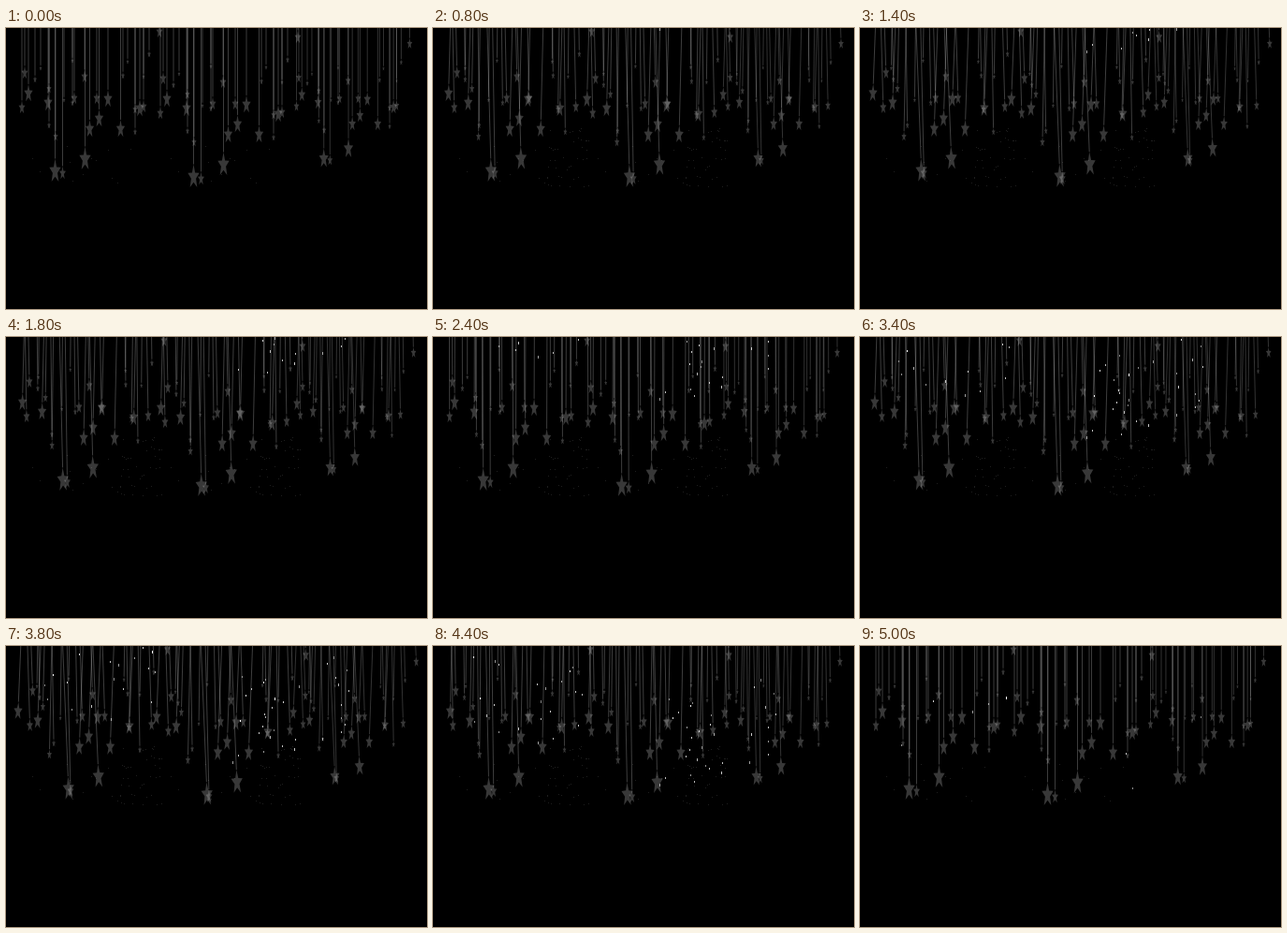
An HTML page with a canvas that plays this animation: 450x300 px, repeating every 5.2 s.

```html
<!DOCTYPE html>
<html lang="en">
<head>
<meta charset="utf-8">
<title>Hanging stars</title>
<style>
  html, body { margin: 0; width: 100%; height: 100%; overflow: hidden; background: #000; }
  canvas { display: block; }
</style>
</head>
<body>
<canvas id="stage" width="450" height="300"></canvas>
<script>
const ctx = document.getElementById('stage').getContext('2d');
const LOOP = 5200, STEP = 200, SWING = 2.5;
const PIVOT_Y = -200; // strings swing around points far above the stage
const FALL_SPEED = 41;

// Where the stars hang, from the nearest layer to the farthest.
// Each layer is smaller, sways less and swings against the one before.
const LAYERS = [
  [[52.5, 153], [84.5, 140]],
  [[24, 70], [45, 80], [89.5, 108], [99.5, 97], [109, 76], [122.5, 108], [143, 86]],
  [[17, 85], [20, 48], [60.5, 155], [73, 75], [84, 52], [97, 75], [147, 84], [164, 4]],
  [[46, 65], [53, 116], [138, 87]],
  [[31, 55], [46, 104], [71, 80], [125, 51], [138, 111], [153, 28]],
  [[37, 43], [62, 77], [71, 35], [130, 36], [147, 52]]
];

// The same curtain hangs three times
const CURTAINS = [
  { x: 0, y: 0, scale: 1 },
  { x: 148, y: 6, scale: 1 },
  { x: 296.5, y: 13.7, scale: 0.823 }
];

const GLITTER = [
  { left: 40, width: 120, start: 1.9, count: 26 },
  { left: 232, width: 84, start: 0.8, count: 28 },
  { left: 330, width: 40, start: 1.4, count: 13 }
];

const hash = (a, b) => {
  const v = Math.sin(a * 127.1 + b * 311.7) * 43758.5453;
  return v - Math.floor(v);
};

function starPath(radius) {
  ctx.beginPath();
  for (let i = 0; i < 10; i++) {
    const r = i % 2 ? radius * 0.42 : radius;
    const a = i * Math.PI / 5;
    ctx.lineTo(Math.sin(a) * r * 0.48, -Math.cos(a) * r);
  }
  ctx.closePath();
}

function drawStar(x, y, radius, offset) {
  const length = y - PIVOT_Y;
  ctx.save();
  ctx.translate(x, PIVOT_Y);
  ctx.rotate(-offset / length);
  ctx.translate(0, length);
  ctx.strokeStyle = 'rgba(255,255,255,.27)';
  ctx.lineWidth = 0.9;
  ctx.beginPath();
  ctx.moveTo(0, -length);
  ctx.lineTo(0, -radius);
  ctx.stroke();
  ctx.fillStyle = 'rgba(255,255,255,.22)';
  starPath(radius);
  ctx.fill();
  ctx.restore();
}

function drawCurtain({ x, y, scale }, swing) {
  ctx.save();
  ctx.translate(x, y);
  ctx.scale(scale, scale);
  LAYERS.forEach((stars, depth) => {
    const radius = 13.5 * 0.75 ** depth;
    const offset = 15 * (-0.77) ** depth * swing;
    for (const [starX, starY] of stars) drawStar(starX, starY, radius, offset);
  });
  ctx.restore();
}

function drawDust(frame) {
  const dense = frame % 5 !== 0;
  ctx.fillStyle = '#1e1e1e';
  for (const left of [0, 148]) {
    for (let i = 0; dense && i < 42; i++) {
      const x = left + 121 + Math.floor(hash(i, 1) * 46);
      ctx.fillRect(x, 107 + Math.floor(i / 6) * 10 + Math.floor(hash(i, 2) * 5), 1, 1);
    }
    for (let i = 0; i < 12; i++) {
      const x = left + 20 + Math.floor(hash(i, 3) * 150);
      ctx.fillRect(x, 124 + Math.floor(hash(i, 4) * 44), 1, 1);
    }
  }
}

function drawGlitter({ left, width, start, count }, frame, time) {
  const visible = time > 4.7 ? 0.2 : 0.8;
  for (let i = 0; i < count; i++) {
    const born = start + 2.3 * i / count;
    if (time < born || hash(i + left, frame + 5) > visible) continue;
    const x = left + Math.floor(hash(i, left) * width);
    const y = Math.floor((time - born) * FALL_SPEED);
    ctx.fillStyle = `rgba(255,255,255,${0.5 + 0.5 * hash(i, 9)})`;
    ctx.fillRect(x, y, 1, i % 4 ? 2 : 3);
  }
}

function draw(now) {
  const frame = Math.floor((now % LOOP) / STEP);
  const time = frame * STEP / 1000;
  const swing = 1 - Math.abs(1 - 2 * (time / SWING % 1));

  ctx.fillStyle = '#000';
  ctx.fillRect(0, 0, 450, 300);
  drawDust(frame);
  CURTAINS.forEach(curtain => drawCurtain(curtain, swing));
  GLITTER.forEach(stream => drawGlitter(stream, frame, time));
}

const start = performance.now();
function tick() {
  draw(performance.now() - start);
  requestAnimationFrame(tick);
}
tick();
</script>
</body>
</html>
```
